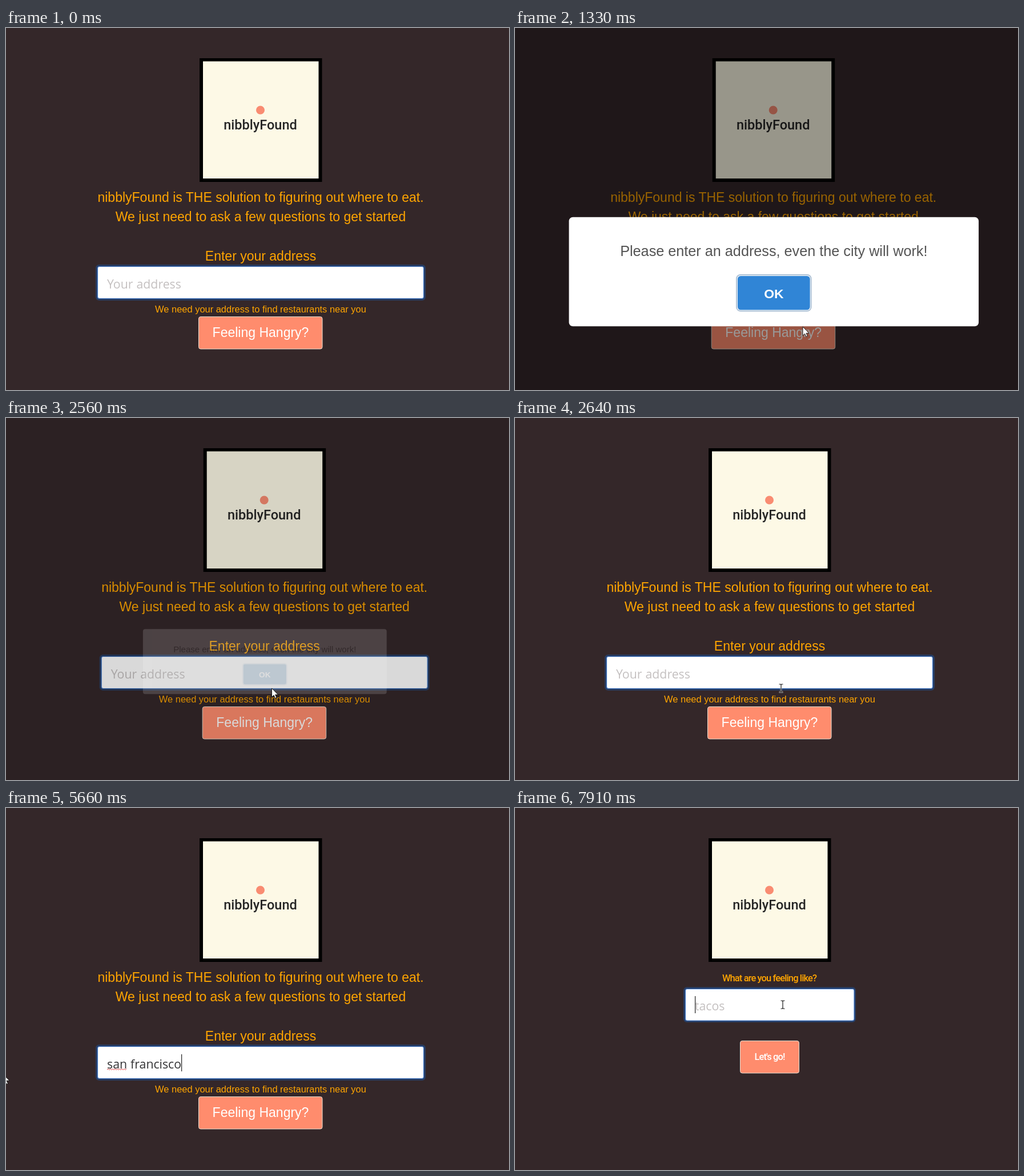
Recreate the animation shown at these times as an HTML page. Size 881x635 px, loop 7.99 s.

```html
<!DOCTYPE html>
<html lang="en">
<head>
<meta charset="utf-8">
<title>Where to eat</title>
<style>
  html, body { margin: 0; width: 100%; height: 100%; overflow: hidden; background: #342729; }
  svg { display: block; width: 881px; height: 635px; }
  text { font: 23px "Liberation Sans", Arial, sans-serif; white-space: pre; }
  .mid { text-anchor: middle; }
  .orange { fill: #ffa500; }
  .small { font-size: 16.44px; }
  .field { font: 21.25px "Open Sans", sans-serif; word-spacing: .6px; fill: #343436; }
  .hint { fill: #c4c0c0; }
  .narrow { font: 500 16.5px Roboto, sans-serif; letter-spacing: -.9px; }
  .brand { font: 500 23.5px Roboto, sans-serif; fill: #252525; }
  .ring { fill: #273c62; }
  .input { fill: #fff; stroke: #477fcf; stroke-width: 1.2; }
  .btn { fill: #ff8c6d; stroke: #eadfd3; stroke-width: 1; }
  .label { fill: #fff; }
  .hover .btn { stroke: #ee8061; }
  .hover .label { fill: #343434; }
  .caret { fill: #222; }
  .cursor { stroke-linejoin: round; }
</style>
</head>
<body>
<svg viewBox="0 0 881 635">
  <rect width="881" height="635" fill="#342729"/>

  <g id="page">
    <rect x="339" y="53" width="214.5" height="217" fill="#000"/>
    <rect x="345" y="58.5" width="202.5" height="205.5" fill="#fdf9e6"/>
    <circle cx="445.5" cy="144" r="7.5" fill="#f98c72"/>
    <text class="mid brand" x="445.5" y="177.5">nibblyFound</text>

    <g id="addressForm">
      <text class="mid orange" x="446" y="304.5">nibblyFound is THE solution to figuring out where to eat.</text>
      <text class="mid orange" x="446" y="339">We just need to ask a few questions to get started</text>
      <text class="mid orange" x="446" y="408">Enter your address</text>
      <rect class="ring" x="157" y="415" width="578" height="63" rx="6"/>
      <rect class="input" x="160.5" y="418.5" width="571" height="56" rx="3"/>
      <text class="field hint" id="hint" x="177" y="456.5">Your address</text>
      <text class="field" id="typed" x="177" y="456.5"></text>
      <path id="squiggle" fill="none" stroke="#e03a3a" stroke-width="1"/>
      <rect class="caret" id="caret" y="432" width="1.2" height="30"/>
      <text class="mid orange small" x="446" y="499">We need your address to find restaurants near you</text>
      <g id="hangry">
        <rect class="btn" x="337.5" y="506.5" width="216.5" height="56.5" rx="3.5"/>
        <text class="mid label" x="446" y="542">Feeling Hangry?</text>
      </g>
    </g>

    <g id="foodForm">
      <text class="mid orange narrow" x="445.5" y="304">What are you feeling like?</text>
      <rect class="ring" x="295" y="314" width="302" height="62" rx="6"/>
      <rect class="input" x="298.5" y="317.5" width="295.5" height="55.5" rx="3"/>
      <text class="field hint" x="315" y="354.5">tacos</text>
      <rect class="caret" id="foodCaret" x="315" y="330" width="1.2" height="30"/>
      <rect class="btn" x="394.5" y="408.5" width="103" height="56.5" rx="3.5"/>
      <text class="mid label narrow" x="446" y="442">Let's go!</text>
    </g>
  </g>

  <rect id="backdrop" width="881" height="635"/>
  <g id="modal">
    <rect x="-368" y="-98" width="736" height="196.5" rx="7" fill="#fff"/>
    <text class="mid" y="-28" fill="#545454" style="font-size:25.875px">Please enter an address, even the city will work!</text>
    <rect x="-68" y="5" width="136" height="67" rx="8" fill="#adc1d5"/>
    <rect x="-66" y="7" width="132" height="63" rx="6" fill="#fff"/>
    <rect id="ok" x="-65" y="8" width="130" height="61" rx="5.5"/>
    <text class="mid" y="48.5" fill="#fff" style="font-size:23.5px;font-weight:bold">OK</text>
  </g>

  <g id="pointer">
    <path class="cursor" id="arrow" fill="#fff" stroke="#111" stroke-width=".9"
      d="M0 0V15.5L3.6 12.2L6 17.5L8.4 16.5L6.1 11.3H11Z"/>
    <path class="cursor" id="hand" fill="#fff" stroke="#111" stroke-width=".9"
      d="M-2 1.5Q-.5-1 1 1.5V7Q2.5 5.8 3.7 7.6Q5.3 6.5 6.3 8.3Q8.5 7.8 8.5 10V14Q8 17 6.5 19.5H-.5Q-3 16-5.2 12.5Q-5.5 9.6-2 12Z"/>
    <g class="cursor" id="beam" fill="none">
      <path d="M-3.5-7H-1L0-6L1-7H3.5M0-6V6M-3.5 7H-1L0 6L1 7H3.5" stroke="#fff" stroke-opacity=".75" stroke-width="2.6"/>
      <path d="M-3.5-7H-1L0-6L1-7H3.5M0-6V6M-3.5 7H-1L0 6L1 7H3.5" stroke="#1c1c1c" stroke-width="1.2"/>
    </g>
    <circle id="click" r="12.3" fill="#fad71e" fill-opacity=".6"/>
  </g>
</svg>

<script>
const LOOP = 7990, TICKS = 103, TICK = LOOP / TICKS;
const el = Object.fromEntries([...document.querySelectorAll('[id]')].map(e => [e.id, e]));

// Pointer path: tick, x, y, shape
const path = [
  [1, 717, 597, 'arrow'], [4, 620, 520, 'arrow'], [6, 545, 488, 'beam'], [8, 505, 485, 'beam'],
  [9, 501, 513, 'hand'], [10, 500, 524, 'hand'], [14, 500, 524, 'hand'],
  [15, 504, 524, 'arrow'], [20, 504, 524, 'arrow'], [21, 503, 537, 'arrow'], [23, 485, 505, 'arrow'],
  [24, 470, 482, 'hand'], [25, 463, 473, 'hand'], [31, 463, 473, 'hand'],
  [32, 465, 474, 'arrow'], [34, 466, 474, 'beam'], [38, 466, 474, 'beam'],
  [39, 420, 468, 'beam'], [40, 290, 450, 'beam'], [41, 90, 456, 'arrow'], [42, -5, 467, 'arrow'],
  [81, -5, 467, 'arrow'], [85, 290, 500, 'arrow'], [87, 425, 522, 'hand'], [89, 425, 522, 'hand'],
  [90, 427, 518, 'arrow'], [92, 430, 487, 'arrow'], [93, 430, 487, 'arrow'], [94, 433, 478, 'arrow'],
  [96, 452, 403, 'arrow'], [97, 452, 403, 'arrow'], [98, 469, 345, 'beam'], [TICKS, 469, 345, 'beam']
];
const city = 'san francisco';
const keyTicks = [46, 47, 50, 51, 53, 56, 57, 59, 60, 63, 68, 72, 73];

// Popup: tick, scale, opacity, backdrop
const popup = [
  [0, 1, 0, 0], [15, .88, 1, .27], [16, 1.038, 1, .4], [17, .975, 1, .4], [18, .985, 1, .4],
  [19, 1, 1, .4], [32, .82, .6, .4], [33, .58, .15, .15], [34, 1, 0, 0]
];

let zigzag = 'M177 459';
for (let i = 1; i <= 17; i++) zigzag += `L${177 + i * 2} ${i % 2 ? 457.5 : 459.5}`;
el.squiggle.setAttribute('d', zigzag);

const within = (n, from, to) => n >= from && n < to;
const show = (node, on) => { node.style.display = on ? '' : 'none'; };
const latest = (table, n) => table.findLast(row => row[0] <= n);

function drawPointer(n) {
  const from = latest(path, n);
  show(el.pointer, from);
  if (!from) return;
  const to = path[path.indexOf(from) + 1] || from;
  const k = to === from ? 0 : (n - from[0]) / (to[0] - from[0]);
  const x = from[1] + (to[1] - from[1]) * k, y = from[2] + (to[2] - from[2]) * k;
  el.pointer.setAttribute('transform', `translate(${x} ${y})`);
  for (const shape of ['arrow', 'hand', 'beam']) show(el[shape], shape === from[3]);
  show(el.click, n === 14 || n === 31 || n === 88 || within(n, 99, 102));
  el.click.setAttribute('transform', from[3] === 'beam' ? 'translate(3.5 -1.5)' : 'translate(-.5 0)');
}

function drawPopup(n) {
  const [, scale, opacity, shade] = latest(popup, n);
  el.modal.setAttribute('transform', `translate(453.3 427.2) scale(${scale})`);
  el.modal.setAttribute('opacity', opacity);
  el.backdrop.setAttribute('opacity', shade);
  el.ok.setAttribute('fill', n >= 31 ? '#266aab' : n >= 24 ? '#2b78c1' : '#3085d6');
  // The scrollbar goes away while the popup is open
  el.page.setAttribute('transform', `translate(${opacity ? 6.7 : 0} 0)`);
}

function drawForms(n) {
  const second = n >= 90;
  show(el.addressForm, !second);
  show(el.foodForm, second);
  show(el.foodCaret, n >= 99);
  el.hangry.classList.toggle('hover', within(n, 9, 15) || within(n, 87, 90));

  const count = keyTicks.filter(k => k <= n).length;
  el.typed.textContent = city.slice(0, count);
  show(el.hint, !count);
  show(el.squiggle, count > 3);
  show(el.caret, within(n, 37, 44) || within(n, 46, 80) || within(n, 87, 88));
  el.caret.setAttribute('x', 177 + (count && !second ? el.typed.getComputedTextLength() : 0));
}

let shown = -1;
function frame(now) {
  const n = Math.min(TICKS - 1, Math.floor((now % LOOP + 8) / TICK));
  if (n !== shown) {
    shown = n;
    drawForms(n);
    drawPopup(n);
    drawPointer(n);
  }
  requestAnimationFrame(() => frame(performance.now() - start));
}
const start = performance.now();
frame(0);
</script>
</body>
</html>
```
